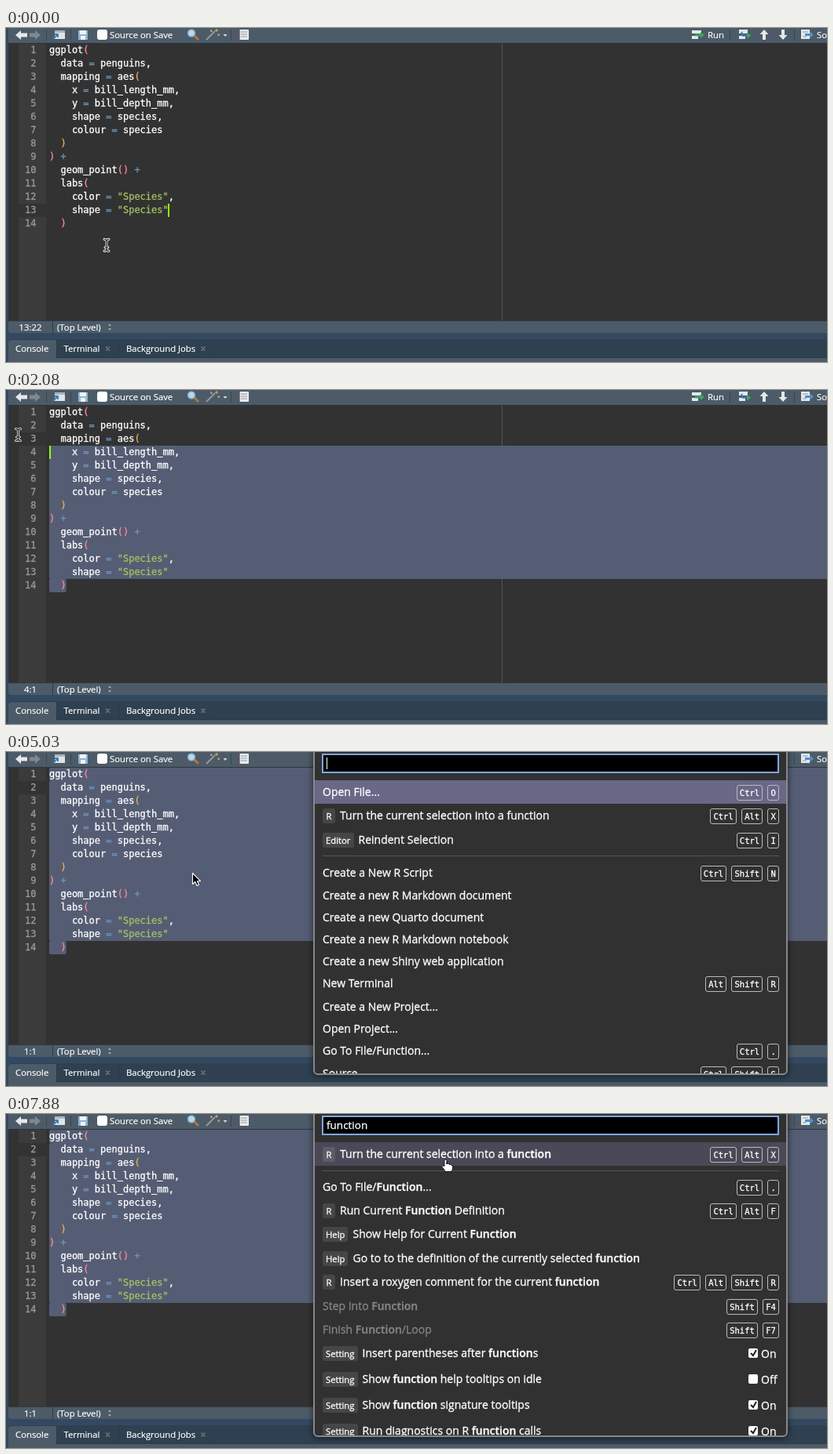
Recreate the animation shown at these times as an HTML page. Size 1045x426 px, loop 8 s.

```html
<!DOCTYPE html>
<html lang="en">
<head>
<meta charset="utf-8">
<title>Command palette</title>
<style>
html, body { margin: 0; width: 100%; height: 100%; overflow: hidden; background: #324961; }
#stage { position: relative; width: 1045px; height: 426px; overflow: hidden; font-family: "Open Sans", "Noto Sans", sans-serif; color: #fff; -webkit-text-stroke: .3px; }
#stage > * { position: absolute; }
svg { left: 0; top: 0; }
svg text { font: 500 11.3px "Open Sans", "Noto Sans", sans-serif; fill: #fff; stroke: #fff; stroke-width: .2; }
pre { margin: 0; top: 20px; font: 12px/17px "DejaVu Sans Mono", "Liberation Mono", monospace; }
#code { left: 55px; }
#numbers { left: 16px; width: 22.5px; text-align: right; color: #999; }
.op { color: #6c99bb; }
.str { color: #a5c261; }
.d0 { color: #ff8b9b; }
.d1 { color: #e8b34c; }

#palette { left: 391px; top: -8px; width: 600px; height: 416px; border: 2px solid #888; border-radius: 6px; background: #313131; box-shadow: 0 1px 8px rgba(0, 0, 0, .6); overflow: hidden; font-size: 14px; }
#palette > * { position: absolute; }
#input { left: 9px; top: 8px; width: 578px; height: 21px; background: #000; border: 2px solid #7fa6e6; font-size: 13.5px; line-height: 21px; text-indent: 4px; white-space: nowrap; }
#input i { display: inline-block; width: 1px; height: 15px; background: #fff; vertical-align: -3px; }
#bar { left: 0; top: 42px; width: 600px; height: 30px; }
#list { left: 10px; top: 6px; width: 581px; }
.row { position: absolute; left: 0; width: 581px; height: 30px; display: flex; align-items: center; white-space: pre; }
.row.off { color: #858585; }
.row b { font-weight: 600; }
.row hr { flex: 1; margin: 0; border: 0; height: 1px; background: #555; }
.badge { font-size: 11.3px; line-height: 19px; min-width: 8px; padding: 0 4px; margin-right: 6px; border-radius: 3px; background: rgba(255, 255, 255, .1); text-align: center; position: relative; top: 1.5px; }
.keys { margin-left: auto; display: flex; gap: 6px; position: relative; top: 1.5px; color: #fff; }
kbd { font: 10.5px/18px "DejaVu Sans Mono", monospace; padding: 0 3.2px; border: 1px solid #bbb; border-radius: 3px; }
.toggle { width: 39px; position: relative; top: 1px; margin-left: auto; display: flex; align-items: center; gap: 4px; }
</style>
</head>
<body>
<div id="stage">
  <svg width="1045" height="426">
    <rect x="3" width="1042" height="19" fill="#4c5b67"/>
    <rect x="3" y="19" width="1042" height="1" fill="#2c363e"/>
    <rect x="3" y="20" width="1042" height="353" fill="#323232"/>
    <rect x="16" y="20" width="35" height="353" fill="#3b3b3b"/>
    <rect id="gutterRow" x="16" width="35" height="17" fill="#323334"/>
    <path d="M631.5 20V373" stroke="#555"/>
    <g id="selection" fill="#5a647e" fill-opacity=".88"></g>
    <g id="brackets" fill="none" stroke="#6a6a6a">
      <rect x="97.5" y="190.5" width="8" height="16"/><rect x="68.5" y="241.5" width="8" height="16"/>
    </g>

    <path d="M3 373H1045V389H7Q3 389 3 385Z" fill="#4c5b67"/>
    <path d="M3 373.5H1045M59.5 374V389" stroke="#2f3a43"/>
    <text id="position" y="385.5" text-anchor="middle" x="31"></text>
    <text x="65" y="385.5">(Top Level)</text>
    <path d="M130 380l2-3 2 3zM130 383l2 3 2-3z" fill="#9aa6af"/>

    <path d="M3 426V402Q3 397 8 397H1045V426Z" fill="#2f4050"/>
    <path d="M3 426V402Q3 398 8 398H64V420H1045V426Z" fill="#4c5b67"/>
    <path d="M64.5 398V420M144.5 398V420M264.5 398V420M64 420.5H1045" stroke="#2c3b49"/>
    <text x="12" y="412.5">Console</text>
    <text x="73.5" y="412.5">Terminal</text>
    <text x="153" y="412.5">Background Jobs</text>
    <path d="M127 406.500l5 5m0-5l-5 5M248.500 406.500l5 5m0-5l-5 5" stroke="#6a7883" stroke-width="1.500"/>

    <path d="M12 9l7-6v3.500h8v5h-8V15z" fill="#e6e8ea"/>
    <path d="M44 9l-7-6v3.500h-7v5h7V15z" fill="#7d8991"/>
    <path d="M51.500 2V16M82.500 2V16M286.500 2V16M921.500 2V16M1003.500 2V16" stroke="#3a4650"/>
    <path d="M62 3h13v11H62z" fill="#dfe4e8"/><path d="M62 3h13v3H62z" fill="#aab4bd"/>
    <path d="M60 14l6-6m-4 0h4v4" fill="none" stroke="#3f7fb5" stroke-width="2"/>
    <path d="M92 3h12v12H92z" fill="#8fb4d4"/><path d="M94 3h8v5h-8zM95 10h6v5h-6z" fill="#eef3f7"/>
    <rect x="116" y="2" width="13" height="13" rx="3" fill="#fff"/>
    <text x="132" y="12.500">Source on Save</text>
    <path d="M239 9l6 6" stroke="#b5763c" stroke-width="3"/>
    <circle cx="236" cy="6.500" r="4.500" fill="#b9d9ee" stroke="#7fa9c6" stroke-width="1.500"/>
    <path d="M255 15L266 4" stroke="#8f999f" stroke-width="2"/>
    <path d="M268 1v4m-2-2h4M271 7v3m-2-1h3M261 2v3m-1-1h3" stroke="#d9b36a"/>
    <path d="M276.500 8h5l-2.500 3z" fill="#d5dade"/>
    <rect x="297" y="2" width="12" height="13" rx="1" fill="#e9ecee"/>
    <path d="M299 5h8M299 8h8M299 11h8" stroke="#8b9aa6"/><path d="M297.500 2V15" stroke="#b77a7a"/>
    <path d="M873 3h12v4h-12zM873 10h8v4h-8z" fill="#e4e8eb"/>
    <path d="M877 7.500h7V5l5 4-5 4v-2.500h-7z" fill="#39a85b"/>
    <text x="893" y="12.500">Run</text>
    <path d="M933 2h11v5h-11zM933 10h8v4h-8z" fill="#e4e8eb"/>
    <path d="M937 5q-3 6 6 4.500" fill="none" stroke="#3b72c4" stroke-width="2"/>
    <path d="M943 6l5.500 3.500-5.500 4z" fill="#39a85b"/>
    <path d="M965 2l5.500 6H967v7h-4V8h-3.500zM989 15l5.500-6H991V2h-4v7h-3.500z" fill="#e6e8ea"/>
    <path d="M1012 2h11v12h-11z" fill="#e4e8eb"/><path d="M1014 5h7M1014 11h5" stroke="#8b9aa6"/>
    <path d="M1017 7h6V4l5 4.500-5 4.500v-3h-6z" fill="#4f8fc9"/>
    <text x="1032" y="12.500">Source</text>
  </svg>
  <pre id="numbers"></pre>
  <pre id="code"></pre>
  <svg width="1045" height="426"><rect id="caret" width="2" height="17" fill="#91ff00"/></svg>
  <div id="palette">
    <div id="bar"></div>
    <div id="input"></div>
    <div id="list"></div>
  </div>
  <svg width="1045" height="426">
    <defs><path id="beamShape" d="M-3-7.500Q0-7.500 0-5Q0-7.500 3-7.500M0-5V5M-3 7.500Q0 7.500 0 5Q0 7.500 3 7.500M-2 3H2"/></defs>
    <g id="mouse" stroke-linejoin="round">
      <g id="beam" fill="none" stroke-linecap="round">
        <use href="#beamShape" stroke="#fff" stroke-width="2.800"/>
        <use href="#beamShape" stroke="#111" stroke-width="1.200"/>
      </g>
      <path id="arrow" d="M0 0V14L3.300 11L5.500 16L8 15L5.900 10.200H10Z" fill="#000" stroke="#fff" stroke-width="1.100"/>
      <path id="hand" d="M-1.500 8V1.500Q-1.500 0 0 0T1.500 1.500V6Q2 0 2 5.500Q4.500 4.500 4.700 6.300Q7 5.500 7.200 7.200Q9.300 7 9.300 9Q9.300 13 7.500 15.500H0Q-2.500 12-4.800 9Q-4.500 6.800-1.500 8.500Z" fill="#fff" stroke="#111" stroke-width="1"/>
    </g>
  </svg>
</div>
<script>
const $ = id => document.getElementById(id);
const LOOP = 8000, CHAR = 7.224, LEFT = 55, ROW = 17;
const rowY = row => 20 + (row - 1) * ROW;

const source = `ggplot(
  data = penguins,
  mapping = aes(
    x = bill_length_mm,
    y = bill_depth_mm,
    shape = species,
    colour = species
  )
) +
  geom_point() +
  labs(
    color = "Species",
    shape = "Species"
  )`;

function highlight(text) {
  let depth = 0;
  const span = (cls, s) => `<span class="${cls}">${s}</span>`;
  return text.replace(/"\w+"|[=+()]/g, s => {
    if (s === '(') return span('d' + depth++, s);
    if (s === ')') return span('d' + --depth, s);
    return span(s[0] === '"' ? 'str' : 'op', s);
  });
}
$('code').innerHTML = highlight(source);
$('numbers').textContent = source.split('\n').map((_, i) => i + 1).join('\n');

// Row format: centre y | badge | label | keys or toggle
const functionRows = `92||Go To File/Function...|Ctrl .
122|R|Run Current Function Definition|Ctrl Alt F
152|Help|Show Help for Current Function|
183|Help|Go to to the definition of the currently selected function|
213|R|Insert a roxygen comment for the current function|Ctrl Alt Shift R
244||Step Into Function|Shift F4
274||Finish Function/Loop|Shift F7
304|Setting|Insert parentheses after functions|On
337|Setting|Show function help tooltips on idle|Off
370|Setting|Show function signature tooltips|On
403|Setting|Run diagnostics on R function calls|On`;
const turn = 'R|Turn the current selection into a function|Ctrl Alt X';
const lists = {
  all: `50||Open File...|Ctrl O
80|${turn}
111|Editor|Reindent Selection|Ctrl I
132
153||Create a New R Script|Ctrl Shift N
182||Create a new R Markdown document|
210||Create a new Quarto document|
238||Create a new R Markdown notebook|
266||Create a new Shiny web application|
294||New Terminal|Alt Shift R
324||Create a New Project...|
352||Open Project...|
380||Go To File/Function...|Ctrl .
409||Source|Ctrl Shift S`,
  f: `50||Open File...|Ctrl O
80|${turn}
102
` + functionRows.replace(/^\d+/gm, y => +y + 30),
  func: `50|${turn}
72
` + functionRows
};

function toggle(state) {
  const tick = state === 'On' ? '<path d="M3 6l3 3 4-7" fill="none" stroke="#222" stroke-width="2"/>' : '';
  return `<span class="toggle"><svg width="12" height="12"><rect width="12" height="12" rx="2" fill="#fff"/>${tick}</svg>${state}</span>`;
}

function rowHtml(line, query) {
  const [y, badge, label, keys] = line.split('|');
  const open = cls => `<div class="row ${cls}" style="top:${y - 15}px">`;
  if (label === undefined) return open('') + '<hr></div>';
  const text = query ? label.replace(new RegExp(query, 'gi'), '<b>$&</b>') : label;
  let right = '';
  if (/^O(n|ff)$/.test(keys)) right = toggle(keys);
  else if (keys) right = `<span class="keys">${keys.split(' ').map(k => `<kbd>${k}</kbd>`).join('')}</span>`;
  return open(/^(Step|Finish)/.test(label) ? 'off' : '') +
    (badge && `<span class="badge">${badge}</span>`) + `<span>${text}</span>${right}</div>`;
}

// Hard changes: [time, value...]
const caretSteps = [[0, 1], [60, 0], [420, 1], [1020, 0], [1440, 1], [2700, 0], [3110, 1], [3710, 0]];
const cursorSteps = [[0, 13, 21, 13], [1440, 14, 3, 14], [1910, 11, 3, 11], [2020, 11, 3, 4], [2080, 4, 0, 3], [2150, 1, 0, 2]];
const typedSteps = [[0, ''], [5570, 'f'], [5720, 'fu'], [5790, 'fun'], [5970, 'func'], [6030, 'funct'], [6160, 'functi'], [6230, 'functio'], [6300, 'function']];
const listSteps = [[0, 'all', ''], [5630, 'f', 'f'], [5970, 'func', 'func'], [6100, 'func', 'funct'], [6300, 'func', 'functi'], [6360, 'func', 'functio'], [6540, 'func', 'function']];
const inputCaretSteps = [[0, 1], [4550, 0], [5030, 1], [6840, 0], [7320, 1], [7800, 0]];
const dragPath = [[1790, 128, 277], [1850, 112, 250], [1910, 80, 200], [2020, 22, 83], [2150, 8, 28], [2250, 5, 6], [2400, 30, 20], [2500, 90, 70], [2590, 163, 116], [2650, 195, 134], [2700, 226, 150], [2760, 238, 156]];

const at = (steps, t) => steps.filter(s => s[0] <= t).pop().slice(1);

function along(path, t) {
  const next = path.findIndex(p => p[0] > t);
  if (next === 0) return path[0].slice(1);
  if (next < 0) return path[path.length - 1].slice(1);
  const a = path[next - 1], b = path[next], k = (t - a[0]) / (b[0] - a[0]);
  return [1, 2].map(i => a[i] + (b[i] - a[i]) * k);
}

function pointer(t) {
  if (t < 4070) return ['beam', ...along(dragPath, t)];
  const step = Math.max(0, Math.min(14, Math.floor((t - 7020) / 61.5) + 1));
  const k = step / 14, e = k * k * (3 - 2 * k);
  const x = 237.5 + 320.5 * e + (t >= 7880 ? 1.5 : 0);
  return [x > 393 ? 'hand' : 'arrow', x, 154.5 - 96.5 * e];
}

const cache = {};
function once(name, key, draw) {
  if (cache[name] !== key) { cache[name] = key; draw(); }
}
const show = (id, on) => { $(id).style.display = on ? '' : 'none'; };

function select(row, col, active) {
  const box = (x, y, w, h) => `<rect x="${x}" y="${y}" width="${w}" height="${h}" rx="2"/>`;
  $('selection').innerHTML = active && row < 14
    ? box(LEFT + col * CHAR, rowY(row), 1000, ROW) +
      box(LEFT, rowY(row + 1), 1000, (13 - row) * ROW) +
      box(LEFT, rowY(14), 3 * CHAR, ROW)
    : '';
}

function frame() {
  const t = performance.now() % LOOP, open = t >= 4070;

  const [row, col, gutter] = at(cursorSteps, t);
  once('cursor', [row, col, gutter].join(), () => {
    select(row, col, t >= 1850);
    $('caret').setAttribute('x', Math.floor(LEFT + col * CHAR));
    $('caret').setAttribute('y', rowY(row));
    $('gutterRow').setAttribute('y', rowY(gutter));
    $('position').textContent = `${row}:${col + 1}`;
  });
  show('caret', at(caretSteps, t)[0]);
  show('brackets', t >= 1550 && t < 1910);
  show('palette', open);

  const [kind, x, y] = pointer(t);
  for (const id of ['beam', 'arrow', 'hand']) show(id, id === kind);
  $('mouse').setAttribute('transform', `translate(${x} ${y})`);

  if (open) {
    const [typed] = at(typedSteps, t), [blink] = at(inputCaretSteps, t), [name, query] = at(listSteps, t);
    once('input', typed + blink, () => { $('input').innerHTML = typed + (blink ? '<i></i>' : ''); });
    once('list', name + query, () => {
      $('list').innerHTML = lists[name].split('\n').map(line => rowHtml(line, query)).join('');
    });
    $('bar').style.background = kind === 'hand' && y < 66 ? '#4b4957' : '#6a6787';
  }
  requestAnimationFrame(frame);
}
frame();
</script>
</body>
</html>
```
